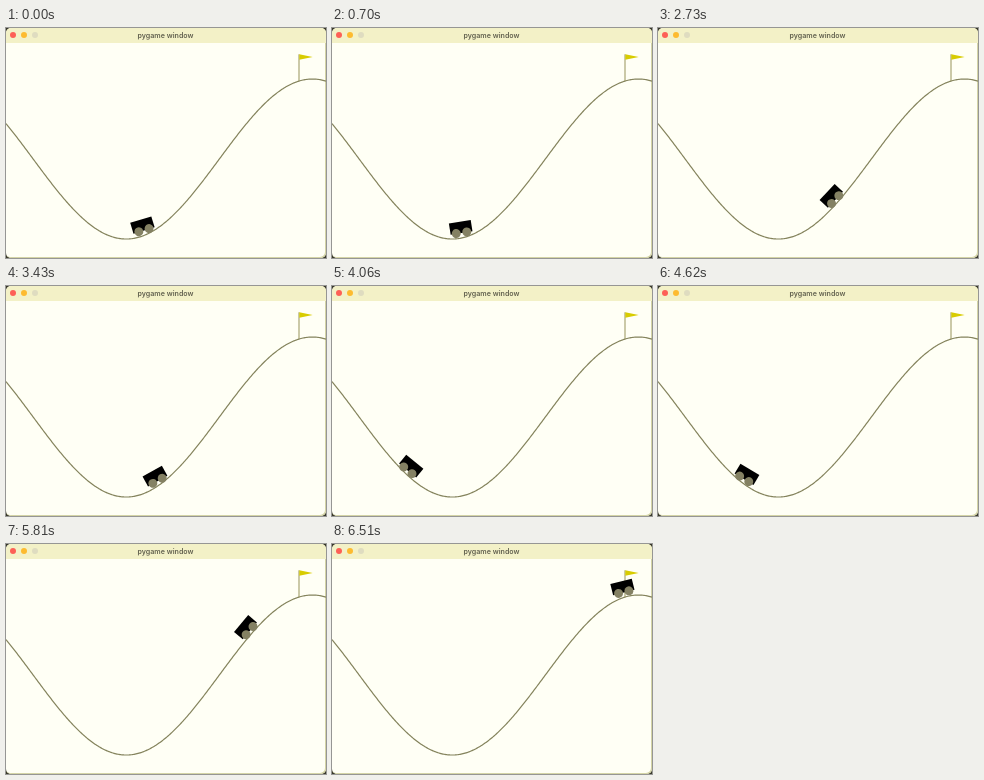
An HTML page with a canvas that plays this animation: 320 px wide and 230 px high, repeating every 6.58 s.

```html
<!DOCTYPE html>
<html lang="en">
<head>
<meta charset="utf-8">
<title>pygame window</title>
<style>
  html, body { margin: 0; width: 100%; height: 100%; overflow: hidden; background: #3a3a2c; }
  #win { position: absolute; left: 0; top: 0; width: 320px; height: 230px; border-radius: 5px; overflow: hidden;
         background: #fffff5; box-shadow: inset -1px -1px #d4d4a6; }
  #bar { position: absolute; left: 0; top: 0; width: 320px; height: 15px; background: #f3f1c7;
         font: 600 7.1px/15px Inter, "Open Sans", sans-serif; color: #62614f; text-align: center; white-space: nowrap; }
  #bar span { position: relative; left: -0.5px; }
  #bar i { position: absolute; top: 4.2px; width: 6.2px; height: 6.2px; border-radius: 50%; }
  canvas { position: absolute; left: 0; top: 0; width: 320px; height: 230px; }
</style>
</head>
<body>
<div id="win">
  <div id="bar">
    <i style="left:4px;background:#fd6056"></i>
    <i style="left:15px;background:#fdbb30"></i>
    <i style="left:26px;background:#dfdcc0"></i>
    <span>pygame window</span>
  </div>
  <canvas id="c" width="320" height="230"></canvas>
</div>
<script>
const ctx = document.getElementById("c").getContext("2d");
const W = 320, H = 230, STEP = 70, LOOP = 6580;
const UNIT = W / 1.8;      // pixels per world unit
const PX = W / 600;        // pixels per unit of car size
const FLOOR = 228.8, GOAL = 0.45;

const toX = p => (p + 1.2) * UNIT;
const toY = p => FLOOR - (Math.sin(3 * p) * 0.45 + 0.55) * UNIT;

// The car rocks between turning points, then runs up to the flag.
const swings = [
  { at: 1, pos: -0.424, speed: 0 },
  { at: 24, pos: -0.564, speed: 0 },
  { at: 42.5, pos: -0.166, speed: 0 },
  { at: 61.4, pos: -0.83, speed: 0 },
  { at: 74, pos: -0.235, speed: 0.061 },
  { at: 93, pos: 0.441, speed: 0.026 }
];

// Smooth curve from a to b that keeps the speed at both ends.
function glide(a, b, n) {
  const d = b.at - a.at, u = Math.max(0, (n - a.at) / d), w = 1 - u;
  return w * w * ((1 + 2 * u) * a.pos + u * d * a.speed)
       + u * u * ((3 - 2 * u) * b.pos - w * d * b.speed);
}

function position(n) {
  const i = Math.max(1, swings.findIndex(s => s.at >= n));
  return glide(swings[i - 1], swings[i], n);
}

function drawHill() {
  ctx.beginPath();
  for (let x = 0; x <= W; x++) ctx.lineTo(x, toY(x / UNIT - 1.2));
  ctx.strokeStyle = "#84835c";
  ctx.lineWidth = 1.2;
  ctx.stroke();
}

function drawCar(p) {
  ctx.save();
  ctx.translate(toX(p), toY(p) - 10 * PX);
  ctx.rotate(-Math.cos(3 * p));
  ctx.fillStyle = "#000";
  ctx.fillRect(-20.7 * PX, -20.7 * PX, 41.4 * PX, 21.4 * PX);
  ctx.fillStyle = "#848163";
  for (const side of [-1, 1]) {
    ctx.beginPath();
    ctx.arc(side * 10 * PX, 0, 8.4 * PX, 0, 2 * Math.PI);
    ctx.fill();
  }
  ctx.restore();
}

const flagX = toX(GOAL), flagTop = toY(GOAL) - 50 * PX;

function drawPole() {
  ctx.fillStyle = "#98945a";
  ctx.fillRect(Math.floor(flagX) - 0.5, flagTop, 1, 50 * PX);
}

function drawFlag() {
  ctx.beginPath();
  ctx.moveTo(flagX, flagTop);
  ctx.lineTo(flagX + 25 * PX, flagTop + 5 * PX);
  ctx.lineTo(flagX, flagTop + 10 * PX);
  ctx.fillStyle = "#d8cc00";
  ctx.fill();
}

const start = performance.now();

function draw() {
  const t = (performance.now() - start) % LOOP;
  ctx.clearRect(0, 0, W, H);
  drawHill();
  drawPole();
  drawCar(position(Math.floor(t / STEP)));
  drawFlag();
  requestAnimationFrame(draw);
}
draw();
</script>
</body>
</html>
```
